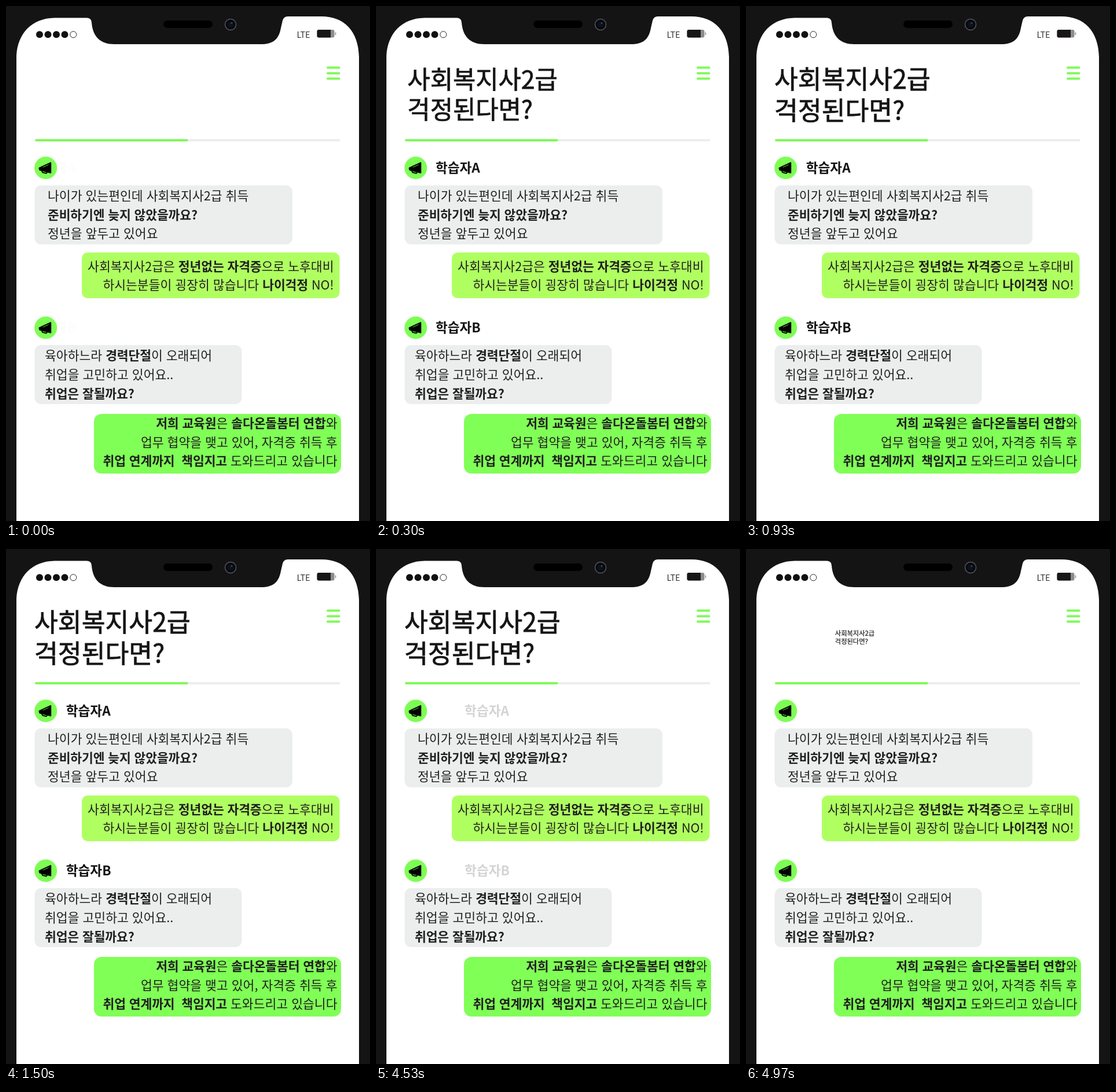
Recreate the animation shown at these times as an HTML page. Size 629 by 890 pixels, loop 5.01 s.

```html
<!DOCTYPE html>
<html lang="ko">
<head>
<meta charset="utf-8">
<title>Chat</title>
<style>
  html, body { margin: 0; width: 100%; height: 100%; overflow: hidden; background: #141414; }
  svg { display: block; width: 100%; height: 100%; }
  text { font: 400 21.55px "Noto Sans CJK KR", "Noto Sans CJK", sans-serif; fill: #1f1f1f; white-space: pre; }
  .b { font-weight: 700; letter-spacing: -.14px; }
  .end { text-anchor: end; }
  #title text { font-size: 44.4px; fill: #151515; stroke: #151515; stroke-width: .8px; }
  .name { font-size: 22.6px; font-weight: 700; fill: #111; }
  .lte { font-size: 14.5px; fill: #333; }
</style>
</head>
<body>
<svg viewBox="0 0 629 890">
  <defs>
    <g id="horn">
      <circle r="19.5" fill="#7efd55"/>
      <path d="M-12-.5L8.500-10Q9.500-10 9.500-8.500V8.500Q9.500 10 8.500 9.500L-11 4.500Q-12.500 2-12-.5Z"/>
      <path d="M-7 5L-5.500 8L1 9.500L3 7" fill="none" stroke="#000" stroke-width="1.800"/>
      <path d="M-5-1L5-5.500" stroke="#7efd55" stroke-width=".8"/>
    </g>
  </defs>

  <rect width="629" height="890" fill="#141414"/>
  <path fill="#fff" d="M18 890V86C20 47 45 21 84 20.500H140Q148 21 148 29C150 53 163 66 187 66H444C464 65 472 55 475 38L478 25Q480 18 487 18H545C585 18 609 44 610 88V890Z"/>
  <rect x="272" y="25" width="85" height="13" rx="6.500"/>
  <circle cx="388" cy="32" r="9.500" fill="#08090c" stroke="#55575c" stroke-width="1.500"/>
  <circle cx="388" cy="32" r="5" fill="#0d1220"/>
  <circle cx="390" cy="29.500" r="1.500" fill="#2c4570"/>

  <g fill="#111">
    <circle cx="58" cy="49.300" r="6"/>
    <circle cx="72.500" cy="49.300" r="6"/>
    <circle cx="87" cy="49.300" r="6"/>
    <circle cx="101.500" cy="49.300" r="6"/>
    <circle cx="116.300" cy="49.300" r="5.500" fill="#fff" stroke="#222"/>
  </g>
  <text class="lte" x="502.500" y="55">LTE</text>
  <rect x="537.500" y="41" width="30" height="13.500" rx="3" fill="#8c8c8c"/>
  <path d="M540.500 41H561V54.500H540.500Q537.500 54.500 537.500 51.500V44Q537.500 41 540.500 41Z" fill="#191616"/>
  <path d="M569.500 45.500V50" stroke="#8c8c8c" stroke-width="1.500"/>

  <g stroke="#80fa5a" stroke-width="4" stroke-linecap="round">
    <path d="M556 106.500H575.500M556 116.300H575.500M556 125.500H575.500"/>
    <path d="M300 232H575.500" stroke="#ededed"/>
    <path d="M52 232H312.500"/>
  </g>

  <g id="title">
    <text x="49" y="143">사회복지사2급</text>
    <text x="49" y="196.500">걱정된다면?</text>
  </g>
  <g id="names">
    <text class="name" x="103.800" y="288">학습자A</text>
    <text class="name" x="103.800" y="564">학습자B</text>
  </g>
  <use href="#horn" x="68.700" y="279.700"/>
  <use href="#horn" x="68.700" y="556"/>

  <rect x="49.500" y="310" width="445.500" height="102" rx="11" fill="#eceeee"/>
  <text x="72" y="336">나이가 있는편인데 사회복지사2급 취득</text>
  <text x="72" y="368.500" class="b">준비하기엔 늦지 않았을까요?</text>
  <text x="72" y="401">정년을 앞두고 있어요</text>

  <rect x="131" y="426" width="445.500" height="79" rx="10" fill="#b0ff61"/>
  <text x="566.500" y="457.700" class="end">사회복지사2급은 <tspan class="b">정년없는 자격증</tspan>으로 노후대비</text>
  <text x="566.500" y="490.300" class="end">하시는분들이 굉장히 많습니다 <tspan class="b">나이걱정</tspan> NO!</text>

  <rect x="49.500" y="586" width="358" height="102" rx="11" fill="#eceeee"/>
  <text x="67" y="612">육아하느라 <tspan class="b">경력단절</tspan>이 오래되어</text>
  <text x="67" y="645">취업을 고민하고 있어요..</text>
  <text x="67" y="677.500" class="b">취업은 잘될까요?</text>

  <rect x="152" y="705" width="427" height="103" rx="13" fill="#80ff56"/>
  <text x="572.500" y="729" class="end"><tspan class="b">저희 교육원</tspan>은 <tspan class="b">솔다온돌봄터 연합</tspan>와</text>
  <text x="572.500" y="761.500" class="end">업무 협약을 맺고 있어, 자격증 취득 후</text>
  <text x="572.500" y="794.300" class="end"><tspan class="b">취업 연계까지&#160; 책임지고</tspan> 도와드리고 있습니다</text>
</svg>
<script>
  const LOOP = 5010;
  const title = document.getElementById('title');
  const names = document.getElementById('names');
  const clamp = v => Math.max(0, Math.min(1, v));
  const wave = (a, b, p) => a + (b - a) * (1 - Math.cos(Math.PI * p)) / 2;

  // Turning points of the title's bounce: [ms, scale]
  const bounce = [[0, 0], [160, 1.19], [262, .935], [365, 1.02], [460, 1]];

  function popScale(ms) {
    const i = bounce.findIndex(([at]) => at > ms);
    if (i < 0) return 1;
    const [t0, s0] = bounce[i - 1], [t1, s1] = bounce[i];
    const p = (ms - t0) / (t1 - t0);
    return wave(s0, s1, i === 1 ? p ** .84 : p);
  }

  function draw(t) {
    // The bounce plays backwards at the end of the loop
    const s = popScale(Math.min(t, LOOP - t));
    title.setAttribute('transform', `translate(189.4 152.5) scale(${s}) translate(-189.4 -152.5)`);

    const away = (1 - clamp(t / 400)) ** 3;
    const leave = clamp((t - 4268) / 320);
    names.setAttribute('transform', `translate(${60 * (leave - away)} 0)`);
    names.setAttribute('opacity', (1 - away) * (1 - leave));
  }

  const start = performance.now();
  function tick() {
    draw((performance.now() - start) % LOOP);
    requestAnimationFrame(tick);
  }
  draw(0);
  requestAnimationFrame(tick);
</script>
</body>
</html>
```
